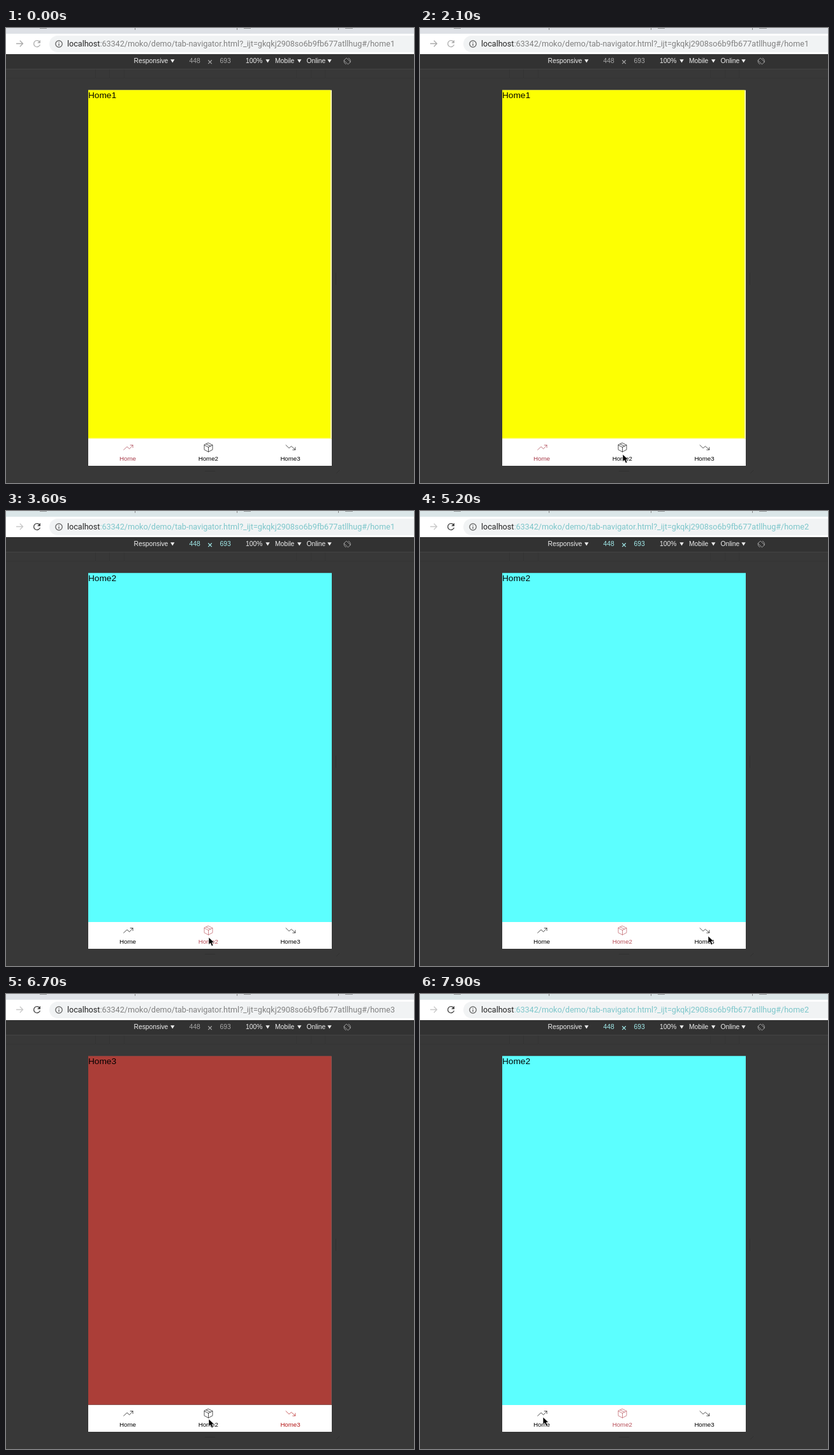
Animation, 640 px wide and 714 px high, one loop 8000 ms. Source, as an HTML page:

```html
<!DOCTYPE html>
<html>
<head>
<meta charset="utf-8">
<style>
html, body { margin: 0; width: 100%; height: 100%; overflow: hidden; background: #383838; }
svg { display: block; width: 640px; height: 714px; font-family: "Liberation Sans", Arial, sans-serif; }
.url { font: 12.57px Roboto, sans-serif; }
.bar { font-size: 10.3px; fill: #eee; }
.tab { font-size: 9.7px; text-anchor: middle; }
.tab path { fill: none; stroke-width: .8; stroke-opacity: .85; stroke-linejoin: round; stroke-linecap: round; }
</style>
</head>
<body>
<svg viewBox="0 0 640 714">
  <rect id="strip" width="640" height="10"/>
  <path d="M202.500 0v3M362.500 0v3M521.500 0v3" stroke="#888"/>
  <path d="M53 0h11M373 0h11M532 0h12" stroke="#444"/>
  <rect y="9" width="640" height="32" fill="#fff"/>
  <rect x="68" y="12" width="600" height="26" rx="13" fill="#f1f3f4"/>
  <path id="forward" d="M16 24.500h10.500M21.800 19.800l4.700 4.700l-4.700 4.700" fill="none" stroke-width="1.300"/>
  <g id="reload"><path d="M52.600 21.600a5 5 0 1 0 .8 4.500" fill="none" stroke="currentColor" stroke-width="1.400"/>
    <path d="M54 18.800v5h-5z" fill="currentColor"/></g>
  <g fill="none" stroke="#555" stroke-width="1.200"><circle cx="83" cy="25" r="5.200"/><path d="M83 24.300v3.700M83 21.900v1.200"/></g>
  <text class="url" x="96" y="29" fill="#222">localhost<tspan id="path"></tspan></text>

  <rect y="41" width="640" height="23" fill="#323232"/>
  <path d="M0 64.500h640" stroke="#444"/>
  <path d="M0 78.500h640M140.500 65v14M162.500 65v14M185.500 65v14M455.500 65v14M478.500 65v14M500.500 65v14" stroke="#343434"/>
  <g class="bar">
    <text x="200.500" y="55">Responsive</text>
    <text x="376" y="55">100%</text>
    <text x="422" y="55">Mobile</text>
    <text x="471.500" y="55">Online</text>
    <path d="M258 49.300h6.400l-3.200 5.200zM407.300 49.300h6.400l-3.200 5.200zM457 49.300h6.400l-3.200 5.200zM504.300 49.300h6.400l-3.200 5.200z"/>
    <g id="size"><text x="287.500" y="55">448</text><text x="335.500" y="55">693</text>
      <path d="M317.200 50.500l5.600 5.600M322.800 50.500l-5.600 5.600" stroke="currentColor" stroke-width="1.100"/></g>
    <g fill="none" stroke="#aaa" stroke-width=".9"><rect x="532.500" y="47.500" width="5.500" height="9" rx="1" transform="rotate(-45 535.250 52)"/>
      <path d="M530.500 50a5.200 5.200 0 0 0 3 6.800M540 54a5.200 5.200 0 0 0-3-6.800"/></g>
  </g>

  <path d="M517.500 384v19M312 695.500h16M518 699l5-5" stroke="#303030"/>
  <rect x="129" y="644" width="382" height="43" fill="#fff"/>
  <rect id="edge" x="129" y="97.500" width="382" height="547.500"/>
  <rect id="screen" x="129" y="97.500"/>
  <text id="title" x="129" y="110" font-size="13.650"></text>
  <g class="tab"><path d="M184.500 662l5.500-5l3.500 3.500l5.500-6M195 654.500h4v4"/><text x="191" y="679">Home</text></g>
  <g class="tab"><path d="M317.500 651.200l6.500 3.300v7.200l-6.500 3.500l-6.500-3.500v-7.200zM311 654.500l6.500 3.300l6.500-3.300M317.500 657.800v7.200M314.200 652.900l6.500 3.300"/><text x="317.300" y="679">Home2</text></g>
  <g class="tab"><path d="M439 654.500l5 4.800l3.500-3l6.300 5.500M449.800 662h4v-4"/><text x="446" y="679">Home3</text></g>
  <path id="cursor" d="M0 0v11.500l2.700-2.500l2 4.700l2.300-1l-2-4.500h3.700z" stroke="#fff" stroke-width=".6"/>
</svg>
<script>
const $ = id => document.getElementById(id);
const tabs = document.querySelectorAll('.tab');
const route = ':63342/moko/demo/tab-navigator.html?_ijt=gkqkj2908so6b9fb677atllhug#/home';

const looks = [
  { screen: '#fdff02', edge: '#fffbb0', width: 380, height: 546, active: '#a83e4c', url: '#808080', size: '#aaa', strip: '#dee1e6' },
  { screen: '#5cffff', edge: '#5cffff', width: 382, height: 546.5, active: '#b8505a', url: '#7cc6ca', size: '#a4eeee', strip: '#dbe6e8' },
  { screen: '#ab3e38', edge: '#8a5552', width: 381, height: 546.5, active: '#b31515', url: '#808080', size: '#aaa', strip: '#dee1e6' }
];
const pages = [[0, 0], [3600, 1], [5300, 2], [6800, 1]];
// Each move: start, end, from x, y, to x, y
const moves = [
  [1300, 1800, 336, 716, 318, 669],
  [4300, 4900, 318, 669, 452, 667],
  [5800, 6400, 452, 667, 318, 667],
  [7200, 7800, 318, 667, 193, 664]
];

const pageAt = t => pages.filter(([start]) => start <= t).pop()[1];

function cursorAt(t) {
  const [start, end, x0, y0, x1, y1] = moves.filter(m => m[0] <= t).pop() || moves[0];
  const p = Math.max(0, Math.min(1, (t - start) / (end - start)));
  const k = p * p * (3 - 2 * p);
  return [x0 + (x1 - x0) * k, y0 + (y1 - y0) * k];
}

function draw(now) {
  const t = Math.floor(now % 8000 / 100) * 100;
  const page = pageAt(t), look = looks[page];
  $('screen').setAttribute('fill', look.screen);
  $('screen').setAttribute('width', look.width);
  $('screen').setAttribute('height', look.height);
  $('edge').setAttribute('fill', look.edge);
  $('strip').setAttribute('fill', look.strip);
  $('path').setAttribute('fill', look.url);
  $('size').style.fill = $('size').style.color = look.size;
  $('title').textContent = 'Home' + (page + 1);
  // The address follows the page one step later
  $('path').textContent = route + (pageAt(Math.max(0, t - 100)) + 1);
  tabs.forEach((tab, i) => {
    tab.style.fill = tab.firstChild.style.stroke = i === page ? look.active : '#000';
  });
  const ready = t >= 2900;
  $('reload').style.color = ready ? '#444' : '#b0b0b0';
  $('forward').style.stroke = ready ? '#c8c8c8' : '#aaa';
  $('cursor').setAttribute('transform', `translate(${cursorAt(t)})`);
  requestAnimationFrame(draw);
}
requestAnimationFrame(draw);
</script>
</body>
</html>
```
